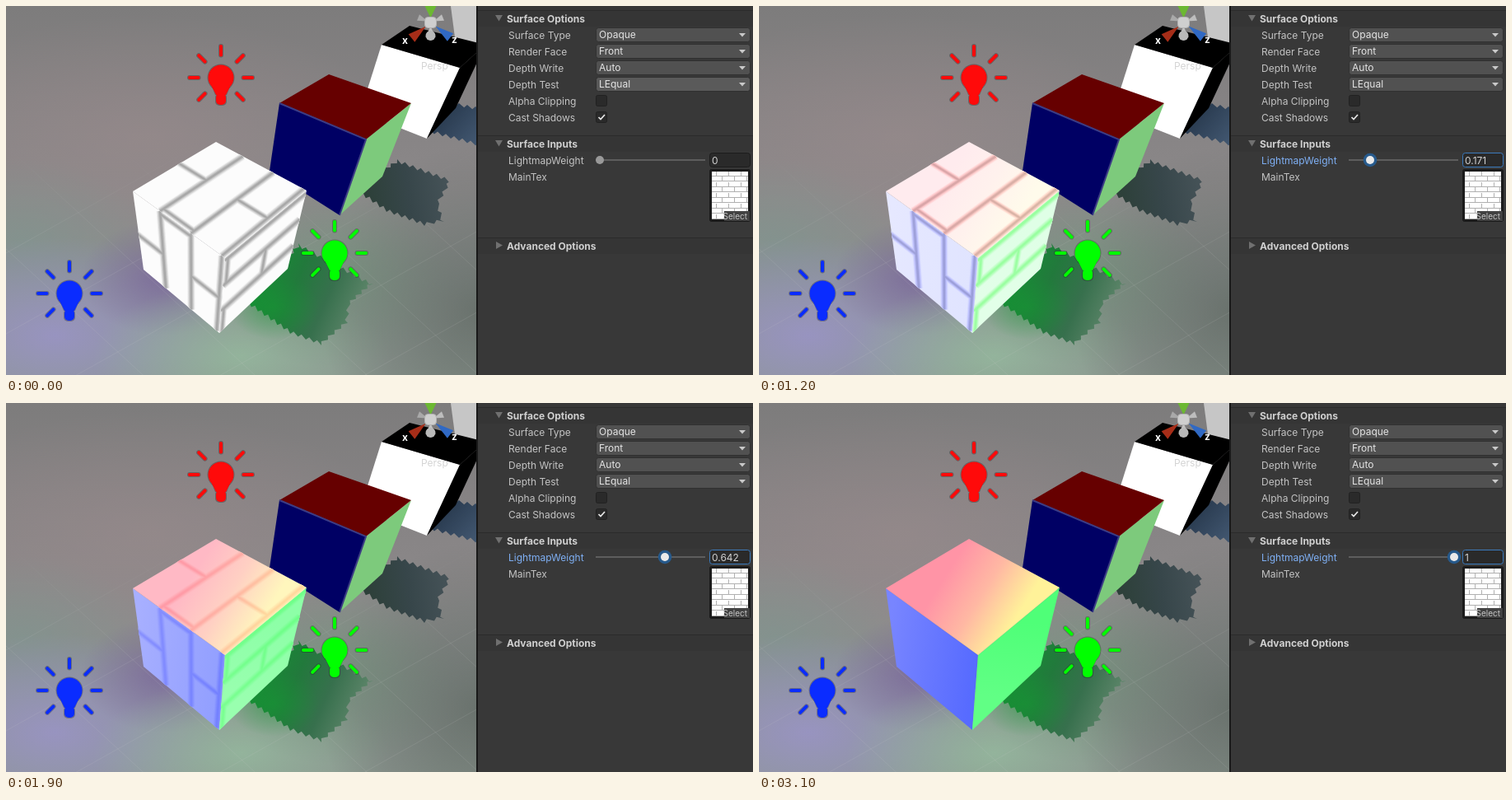
An HTML page with a canvas for the animation above (5.9 s loop, 907 px wide and 448 px high).

```html
<!DOCTYPE html>
<html lang="en">
<head>
<meta charset="utf-8">
<title>Lightmap weight slider</title>
<style>
html, body { margin: 0; width: 100%; height: 100%; overflow: hidden; background: #383838; }
canvas { display: block; width: 907px; height: 448px; }
</style>
</head>
<body>
<canvas id="stage" width="907" height="448"></canvas>
<script>
const W = 907, H = 448, VIEW = 571, LOOP = 5900;
const FONT = 'Inter, Roboto, sans-serif';
const TRAVEL = 123; // slider range in pixels
const DRAG = [[900, 0], [1000, 6], [1400, 36], [1900, 79], [2300, 95], [3100, TRAVEL]];

const stage = document.getElementById('stage').getContext('2d');
const backdrop = document.createElement('canvas');
backdrop.width = W;
backdrop.height = H;
let g = backdrop.getContext('2d');

// ---------- helpers ----------
const clamp01 = v => Math.min(1, Math.max(0, v));
const mix = (a, b, k) => a + (b - a) * k;
const mixPoint = (p, q, k) => [mix(p[0], q[0], k), mix(p[1], q[1], k)];
const grey = v => `rgb(${v},${v},${v})`;

function trace(points) {
  g.beginPath();
  points.forEach(([x, y]) => g.lineTo(x, y));
}

function poly(points, fill) {
  trace(points);
  g.closePath();
  g.fillStyle = fill;
  g.fill();
}

function line(points, color, width) {
  trace(points);
  g.strokeStyle = color;
  g.lineWidth = width;
  g.stroke();
}

function rect(x, y, w, h, fill) {
  g.fillStyle = fill;
  g.fillRect(x, y, w, h);
}

function disc(x, y, r, fill) {
  g.beginPath();
  g.arc(x, y, r, 0, Math.PI * 2);
  g.fillStyle = fill;
  g.fill();
}

function box(x, y, w, h, fill, border, r = 3) {
  g.beginPath();
  g.roundRect(x + 0.5, y + 0.5, w - 1, h - 1, r);
  g.fillStyle = fill;
  g.fill();
  g.strokeStyle = border;
  g.lineWidth = 1;
  g.stroke();
}

function text(str, x, y, color, size = 12, weight = 400) {
  g.font = `${weight} ${size}px ${FONT}`;
  g.fillStyle = color;
  g.fillText(str, x, y);
}

// Linear gradient with evenly spaced colours
function ramp([x0, y0], [x1, y1], colors) {
  const fill = g.createLinearGradient(x0, y0, x1, y1);
  colors.forEach((color, i) => fill.addColorStop(i / (colors.length - 1), color));
  return fill;
}

function glow(x, y, rx, ry, color, alpha) {
  g.save();
  g.translate(x, y);
  g.scale(1, ry / rx);
  const fill = g.createRadialGradient(0, 0, 0, 0, 0, rx);
  [1, 0.5, 0].forEach((k, i) => fill.addColorStop(i / 2, `rgba(${color},${alpha * k})`));
  rect(-rx, -rx, 2 * rx, 2 * rx, fill);
  g.restore();
}

// ---------- floor ----------
function floor() {
  rect(0, 0, VIEW, H, ramp([0, 0], [0, H], ['#7d7c7c', '#858283', '#8b8889', '#8c9190', '#8b958f']));
  glow(170, 160, 300, 150, '158,140,142', 0.5);
  glow(20, 285, 150, 100, '126,150,142', 0.6);
  glow(60, 400, 220, 120, '156,148,208', 0.75);
  glow(190, 330, 100, 70, '116,92,155', 0.65);
  glow(285, 425, 180, 90, '150,190,160', 0.75);
  glow(400, 330, 150, 110, '105,150,115', 0.55);
  glow(571, 370, 190, 200, '95,104,98', 0.75);
}

function gridLines() {
  const fade = ramp([0, 170], [0, 300], ['rgba(205,205,205,0)', 'rgba(205,205,205,.16)']);
  for (let k = 0; k < 6; k++) {
    const rise = 300 + 98 * k, fall = -330 + 125 * k;
    line([[0, rise], [VIEW, rise - 0.56 * VIEW]], fade, 0.8);
    line([[0, fall], [VIEW, fall + 0.92 * VIEW]], fade, 0.8);
  }
}

// Low resolution shadow: every edge becomes a saw
function shadow(corners, fill) {
  const points = [];
  corners.forEach((p, i) => {
    const q = corners[(i + 1) % corners.length];
    const length = Math.hypot(q[0] - p[0], q[1] - p[1]);
    const n = Math.max(1, Math.round(length / 10));
    const nx = 4 * (p[1] - q[1]) / length, ny = 4 * (q[0] - p[0]) / length;
    for (let k = 0; k < n; k++) {
      const [x, y] = mixPoint(p, q, (k + 0.7) / n);
      points.push(mixPoint(p, q, k / n), [x + nx, y + ny]);
    }
  });
  poly(points, fill);
}

function shadows() {
  shadow([[500, 150], [540, 116], [580, 124], [580, 172]],
    ramp([520, 130], [565, 170], ['#25364a', '#41566f']));
  shadow([[420, 222], [475, 186], [542, 211], [526, 240], [532, 262], [508, 267], [462, 250]],
    ramp([440, 240], [540, 225], ['#2d4039', '#37464a', '#465358']));
  shadow([[290, 360], [355, 288], [446, 337], [418, 362], [415, 385], [383, 412], [345, 398]],
    ramp([305, 340], [420, 390], ['#178a35', '#22793c', '#37704d', '#5b8468']));
  glow(325, 365, 55, 40, '20,155,50', 0.5);
}

// ---------- cubes ----------
// Seven visible corners; each face runs from its first corner along a, then along b
const faces = c => ({
  left: [c.l, c.f, c.bf, c.bl],
  right: [c.bf, c.f, c.r, c.br],
  top: [c.l, c.f, c.r, c.t]
});
const FAR = faces({ l: [456, 47], t: [490, 24], r: [582, 47], f: [551, 75],
  bl: [430, 129], bf: [511, 161], br: [546, 124] });
const MIDDLE = faces({ l: [332, 118], t: [392, 83], r: [492, 118], f: [437, 162],
  bl: [320, 200], bf: [405, 254], br: [457, 207] });
const NEAR = faces({ l: [154, 225], t: [255, 165], r: [365, 224], f: [266, 306],
  bl: [167, 320], bf: [259, 397], br: [342, 319] });

function plainCube(cube, left, right, top) {
  poly(cube.left, left);
  poly(cube.right, right);
  poly(cube.top, top);
}

const onFace = ([p, q, r, s], a, b) => mixPoint(mixPoint(p, q, a), mixPoint(s, r, a), b);

// Baked light may exceed 1; `odd` is the brick row whose joint sits at the edge
const LIT = [
  { shape: NEAR.left, odd: 1, axis: [[155, 300], [262, 315]],
    light: [[0.47, 0.52, 1.8], [0.34, 0.42, 1.8]] },
  { shape: NEAR.right, odd: 0, axis: [[310, 265], [300, 358]],
    light: [[0.31, 3, 0.47], [0.38, 3, 0.52]] },
  { shape: NEAR.top, odd: 1, axis: [[225, 212], [310, 265]],
    light: [[1.8, 0.58, 0.65], [1.8, 0.72, 0.64], [1.8, 0.95, 0.6]] }
];

function shade({ axis, light }, tex, w) {
  return ramp(...axis, light.map(lit =>
    `rgb(${lit.map(v => Math.round(255 * clamp01(mix(tex, v, w))))})`));
}

function mortar({ shape, odd }, style, width) {
  for (let row = 0; row < 3; row++) {
    const a = 0.295 + 0.335 * row;
    const b = row % 2 === odd % 2 ? 0.04 : 0.56;
    line([onFace(shape, a, 0), onFace(shape, a, 1)], style, width);
    line([onFace(shape, a - 0.335, b), onFace(shape, a, b)], style, width * 0.85);
  }
}

function brickCube(w) {
  for (const face of LIT) {
    poly(face.shape, shade(face, 0.99, w));
    if (w === 1) continue;
    g.save();
    trace(face.shape);
    g.clip();
    for (let i = 0; i < 4; i++) mortar(face, shade(face, 0.93 - 0.09 * i, w), 9 - 2.2 * i);
    g.restore();
  }
}

// ---------- gizmos ----------
function bulb(x, y, color) {
  const paint = (style, grow) => {
    disc(x, y, 15.5 + grow, style);
    g.lineCap = 'round';
    for (let k = 3; k < 10; k++) {
      const a = k * Math.PI / 4, c = Math.cos(a), s = Math.sin(a);
      line([[x + 27.5 * c, y + 27.5 * s], [x + 38 * c, y + 38 * s]], style, 4 + grow * 2);
    }
    g.lineCap = 'butt';
    poly([[x - 11, y + 11], [x + 11, y + 11], [x + 6 + grow, y + 21], [x - 6 - grow, y + 21]], style);
    g.beginPath();
    g.roundRect(x - 6 - grow, y + 19, 12 + 2 * grow, 14 + grow, 5);
    g.fill();
  };
  paint('rgba(30,25,25,.3)', 1);
  paint(color, 0);
}

// Cone with its tip near the hub and its base at (dx, dy)
function cone(dx, dy, r, color) {
  const x = 515.5, y = 20, d = Math.hypot(dx, dy);
  const px = -dy / d * r, py = dx / d * r;
  poly([[x + dx + px, y + dy + py], [x + dx - px, y + dy - py], [x + dx * 0.25, y + dy * 0.25]], color);
}

function axes() {
  cone(-15, -6, 4, '#a9a9a9');
  cone(15, -6, 4, '#bdbdbd');
  cone(0, -22, 8, '#6cb832');
  cone(-23, 19, 6, '#a62d18');
  cone(24, 18, 6, '#3069c4');
  cone(0, 18, 6, '#c2c2c2');
  disc(515.5, 36, 6, '#b9b9b9');
  box(508, 13, 15, 14, '#cfcfcf', '#b4b4b4', 4);
  text('x', 481, 46, '#fff', 12, 700);
  text('z', 541, 45, '#fff', 12, 700);
  text('Persp', 504, 77, '#d4d4d4');
}

// ---------- inspector ----------
function header(title, y, open) {
  rect(573, y - 9, W - 573, 19, '#353535');
  rect(573, y - 10, W - 573, 1, '#2b2b2b');
  poly(open ? [[594, y - 4], [603, y - 4], [598.5, y + 3.5]]
    : [[595, y - 5], [603, y - 0.5], [595, y + 4]], '#707070');
  text(title, 608, y + 4.5, '#d0d0d0', 12, 700);
}

const label = (str, y, color = '#c4c4c4') => text(str, 610, y + 5, color);

function dropdown(value, y, fill = '#515151') {
  box(716, y - 9, 188, 18, fill, '#303030');
  text(value, 720, y + 4, '#e4e4e4');
  poly([[890, y - 2], [898, y - 2], [894, y + 2.5]], '#c9c9c9');
}

function checkbox(y, on) {
  box(716, y - 7, 14, 14, '#2a2a2a', '#212121', 2);
  if (on) line([[719.5, y], [722, y + 2.5], [727, y - 3]], '#e8e8e8', 1.7);
}

function texturePreview() {
  box(854, 198, 50, 64, '#1c1c1c', '#191919', 2);
  rect(857, 201, 44, 58, '#fff');
  for (let row = 0; row < 9; row++) {
    const y = 201 + Math.round(row * 6.45);
    rect(857, y + 5, 44, 1, '#b0b0b0');
    for (let x = 862 + (row % 2) * 7; x < 901; x += 15) rect(x, y, 1, 5, '#b0b0b0');
  }
  rect(872, 249, 31, 12, '#424242');
  text('Select', 870.5, 259, '#c4c4c4', 10);
}

function inspector() {
  rect(VIEW, 0, W - VIEW, H, '#383838');
  rect(VIEW, 0, 2, H, '#191919');
  header('Surface Options', 15, true);
  header('Surface Inputs', 167, true);
  header('Advanced Options', 291, false);
  ['Surface Type', 'Render Face', 'Depth Write', 'Depth Test', 'Alpha Clipping', 'Cast Shadows']
    .forEach((name, i) => label(name, 35 + 20 * i));
  ['Opaque', 'Front', 'Auto', 'LEqual'].forEach((value, i) => dropdown(value, 35 + 20 * i));
  checkbox(115, false);
  checkbox(135, true);
  label('MainTex', 207);
  texturePreview();
}

function slider(px, active, hover) {
  const x = 721 + px;
  label('LightmapWeight', 187, active ? '#7fb0f5' : '#c4c4c4');
  rect(716, 186, 133, 2, '#5e5e5e');
  if (active) disc(x, 187, 8.3, '#275a8c');
  disc(x, 187, 5, active ? '#eaeaea' : '#999');
  disc(x, 187, 4.2, grey(Math.round(mix(153, 234, hover))));
  box(854, 178, 50, 18, '#2a2a2a', active ? '#3a79bb' : '#1c1c1c');
  text(String(+(px / TRAVEL).toFixed(3)), 857, 192, '#d2d2d2');
}

// ---------- playback ----------
function dragAt(t) {
  if (t <= DRAG[0][0]) return 0;
  const i = DRAG.findIndex(([at]) => t < at);
  if (i < 0) return TRAVEL;
  const [t0, a] = DRAG[i - 1], [t1, b] = DRAG[i];
  return Math.round(mix(a, b, (t - t0) / (t1 - t0)));
}

function draw(now) {
  const t = Math.floor((now % LOOP) / 100) * 100;
  const px = dragAt(t);
  g.drawImage(backdrop, 0, 0);
  brickCube(px / TRAVEL);
  // The pointer leaves the last dropdown and reaches the knob
  dropdown('LEqual', 95, grey(Math.round(mix(90, 81, clamp01(t / 300)))));
  slider(px, t >= 900, clamp01((t - 100) / 200));
}

floor();
gridLines();
shadows();
poly([[540, 0], [VIEW, 0], [VIEW, 46], [545, 38]], '#c6c6c6');
plainCube(FAR, '#fff', '#000', '#000');
plainCube(MIDDLE, '#000064', '#7dca7c', '#660000');
line(MIDDLE.left.slice(0, 3), '#3c3c84', 2);
bulb(261, 87, '#ff0a0a');
bulb(77, 349, '#0a2cff');
bulb(399, 300, '#00ff00');
axes();
inspector();

g = stage;
const start = performance.now();
function tick(now) {
  draw(Math.max(0, now - start));
  requestAnimationFrame(tick);
}
requestAnimationFrame(tick);
</script>
</body>
</html>
```
